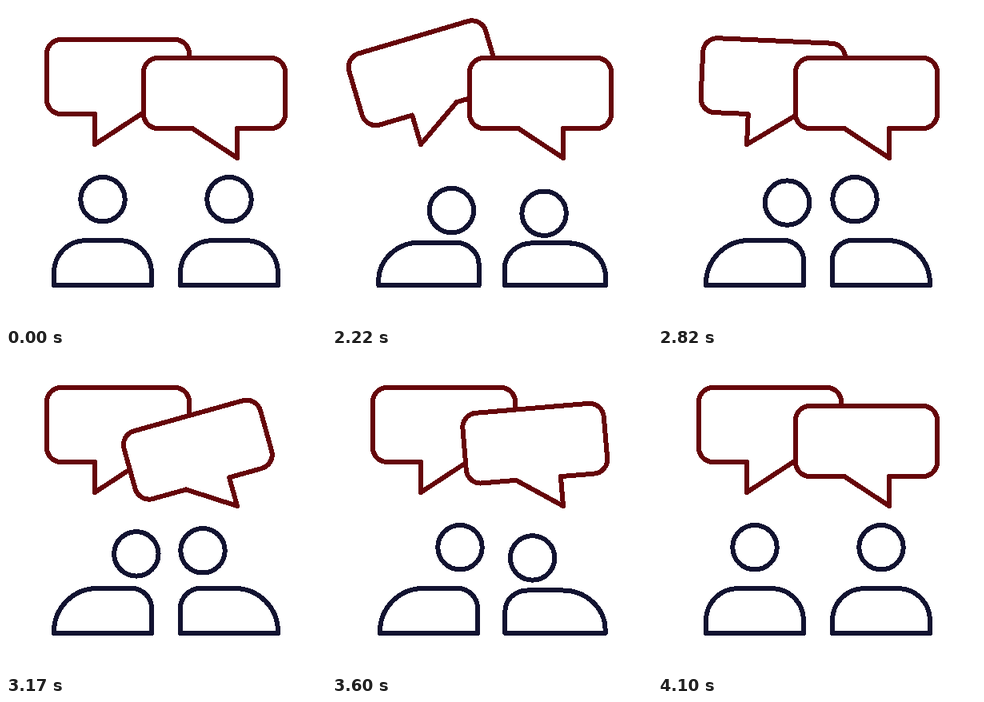
Recreate the animation shown at these times as an HTML page. Size 400x400 px, loop 4120 ms.

```html
<!DOCTYPE html>
<html lang="en">
<head>
<meta charset="utf-8">
<title>Conversation</title>
<style>
  html, body { margin: 0; height: 100%; overflow: hidden; background: #fff; }
  svg { display: block; width: 100%; height: 100%; stroke-width: 6; stroke-linejoin: round; shape-rendering: crispEdges; }
  .bubble { fill: #fff; stroke: #66060a; }
  .person { fill: none; stroke: #121331; }
</style>
</head>
<body>
<svg viewBox="0 0 400 400">
  <path id="bubbleL" class="bubble" d="M69 42H211A18 18 0 0 1 229 60V117A18 18 0 0 1 211 135H169L111 173V135H69A18 18 0 0 1 51 117V60A18 18 0 0 1 69 42Z"/>
  <path id="bubbleR" class="bubble" d="M190 65H331A18 18 0 0 1 349 83V135A18 18 0 0 1 331 153H289V190L233 153H190A18 18 0 0 1 172 135V83A18 18 0 0 1 190 65Z"/>
  <g class="person"><circle id="headL" r="27.7"/><path id="bodyL"/></g>
  <g class="person" transform="matrix(-1 0 0 1 400 0)"><circle id="headR" r="27.7"/><path id="bodyR"/></g>
</svg>
<script>
const LOOP = 4120, REST = 2020;
const SWING = [0, -20, 14.2, -8.4, 2.9, 0], SWING_STEP = 200;
const $ = id => document.getElementById(id);
const clamp = (u, max = 1) => Math.min(max, Math.max(0, u));
const smooth = u => u * u * (3 - 2 * u);
const cubic = u => u < .5 ? 4 * u ** 3 : 1 - 4 * (1 - u) ** 3;
const hump = u => Math.sin(Math.PI * u) ** 2;

// Each person faces inward, nods, then faces front again.
const people = [
  { side: 'L', shift: 39, out: 1984, back: 3700, nod: 2341, half: 308, nods: 2, lean: .35 },
  { side: 'R', shift: 33, out: 2060, back: 3470, nod: 3073, half: 230, nods: 1, lean: 0 }
];

function swing(id, t, start, x, y) {
  const p = clamp((t - start) / SWING_STEP, 5);
  const i = Math.min(4, Math.floor(p));
  const angle = SWING[i] + (SWING[i + 1] - SWING[i]) * smooth(p - i);
  $(id).setAttribute('transform', `rotate(${angle} ${x} ${y})`);
}

function bodyPath(turn, squash) {
  const sx = 1 + .036 * squash, sy = 1 - .06 * squash;
  const left = 121 - 61 * sx, right = 121 + 61 * sx, top = 349 - 56 * sy;
  const outer = 40 + 14 * turn, inner = 40 - 15 * turn;
  const ox = outer * sx, oy = outer * sy, ix = inner * sx, iy = inner * sy;
  return `M${left} 349V${top + oy}A${ox} ${oy} 0 0 1 ${left + ox} ${top}` +
    `H${right - ix}A${ix} ${iy} 0 0 1 ${right} ${top + iy}V349Z`;
}

function pose(p, t) {
  const a = clamp((t - p.out) / 360), b = clamp((t - p.back) / 400);
  const turn = smooth(a) - cubic(b), squash = hump(a) + hump(b);
  const n = clamp((t - p.nod) / p.half, 2 * p.nods);
  const nod = 10.5 * smooth(1 - Math.abs(n % 2 - 1));
  const head = $('head' + p.side);
  head.setAttribute('cx', 121 + p.shift * turn + p.lean * nod);
  head.setAttribute('cy', 241.7 + nod + 18 * squash);
  $('body' + p.side).setAttribute('d', bodyPath(turn, squash));
}

function draw() {
  const now = performance.now() % LOOP;
  const t = now < REST ? 0 : now;
  swing('bubbleL', t, 1981, 111, 173);
  swing('bubbleR', t, 2926, 289, 190);
  people.forEach(p => pose(p, t));
  requestAnimationFrame(draw);
}
draw();
</script>
</body>
</html>
```
